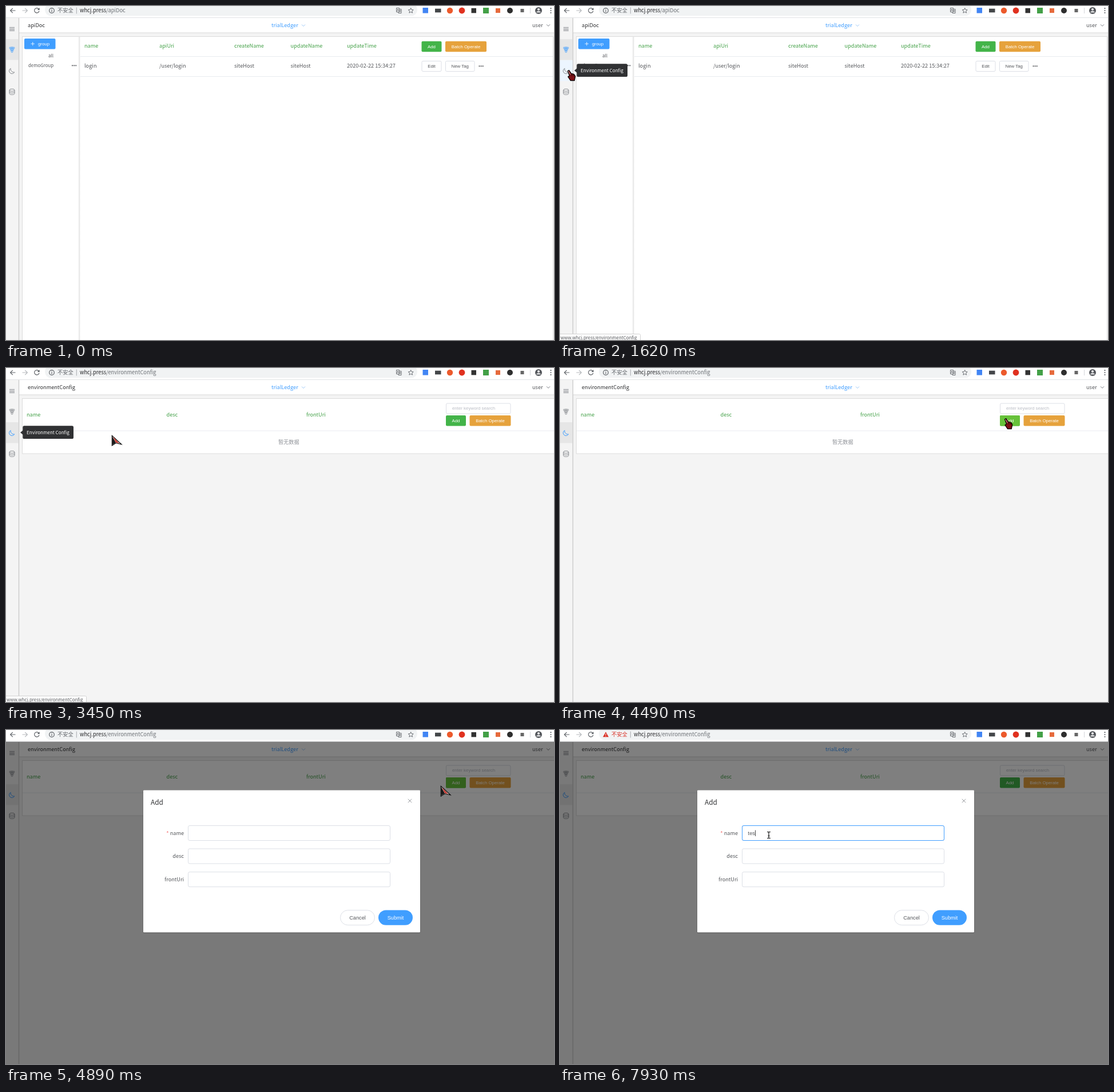
An HTML page for the animation above (8 s loop, 958x585 px).

```html
<!DOCTYPE html>
<html lang="en">
<head>
<meta charset="utf-8">
<title>Environment config</title>
<style>
html, body { margin: 0; width: 100%; height: 100%; overflow: hidden; background: #f4f4f4; }
svg { display: block; width: 100vw; height: 100vh; }
text { font: 9.2px "Noto Sans CJK SC", "Noto Sans CJK", sans-serif; fill: #55575b; white-space: pre; }
.small { font-size: 7.87px; }
.btn { font: 7.87px "Liberation Sans", Arial, sans-serif; text-anchor: middle; }
.big { font: 9.2px "Liberation Sans", Arial, sans-serif; }
.mid { text-anchor: middle; }
.end { text-anchor: end; }
.head text { fill: #43a047; }
.light { fill: #fff; }
.dark { fill: #303133; }
.panel { fill: #fff; stroke: #dcdcdc; }
.rule { stroke: #e9ebf0; }
.field { fill: #fff; stroke: #dcdfe6; }
.green { fill: #43b449; }
.hot { fill: #67c23a; }
.amber { fill: #e6a23c; }
.blue { fill: #409eff; }
.icon { fill: none; stroke: #85888d; }
.icon.on { stroke: #409eff; }
.line { fill: none; stroke: #5f6368; stroke-width: 1.2; }

.anim { opacity: 0; animation: 8s step-end infinite; }
#api { animation-name: api; }
#env { animation-name: env; }
#hover { animation-name: hover; }
#tip { animation-name: tip; }
#status { animation-name: status; }
#hot { animation-name: hot; }
#shade { animation-name: shade; }
#dialog { animation-name: dialog; }
#focus { animation-name: focus; }
#caret { animation-name: caret; }
#safe { animation-name: safe; }
.typed { animation-name: typed; }
#last { animation-name: last; }
#pointer { animation-name: pointer; }
#arrow { animation-name: arrow; }
#hand { animation-name: hand; }
#beam { animation-name: beam; }

@keyframes api { 0% { opacity: 1 } 30.375%, 100% { opacity: 0 } }
@keyframes env { 0% { opacity: 0 } 30.375%, 100% { opacity: 1 } }
@keyframes hover { 0% { opacity: 0 } 12.75% { opacity: 1 } 30.375%, 100% { opacity: 0 } }
@keyframes tip { 0% { opacity: 0 } 12.75% { opacity: 1 } 45.875%, 100% { opacity: 0 } }
@keyframes status { 0% { opacity: 0 } 17.75% { opacity: 1 } 45.875%, 100% { opacity: 0 } }
@keyframes hot { 0% { opacity: 0 } 53.625% { opacity: 1 } 63.625%, 100% { opacity: 0 } }
@keyframes shade { 0% { opacity: 0 } 58.625% { opacity: .41 } 61.125%, 100% { opacity: .5 } }
@keyframes dialog {
  0% { opacity: 0; transform: translateY(-5px) }
  58.625% { opacity: .63; transform: translateY(-5px) }
  61.125%, 100% { opacity: 1; transform: none }
}
@keyframes focus { 0% { opacity: 0 } 71.375%, 100% { opacity: 1 } }
@keyframes caret {
  0% { opacity: 0; transform: none }
  71.375% { opacity: 1; transform: none }
  78.875% { opacity: 0; transform: none }
  84% { opacity: 1; transform: none }
  89.125% { opacity: 0; transform: none }
  94% { opacity: 1; transform: translateX(8px) }
  99.125%, 100% { opacity: 1; transform: translateX(12.5px) }
}
@keyframes safe { 0% { opacity: 1 } 94%, 100% { opacity: 0 } }
@keyframes typed { 0% { opacity: 0 } 94%, 100% { opacity: 1 } }
@keyframes last { 0% { opacity: 0 } 99.125%, 100% { opacity: 1 } }
@keyframes pointer {
  0% { opacity: 0; transform: translate(251px, 205px) }
  2.5% { opacity: 1; transform: translate(251px, 205px) }
  5% { transform: translate(190px, 178px) }
  7.625% { transform: translate(104px, 143px) }
  10.25% { transform: translate(36px, 119px) }
  12.75% { transform: translate(14px, 111px) }
  15.25% { transform: translate(13px, 109px) }
  17.75% { transform: translate(13px, 110px) }
  20.25% { transform: translate(13px, 112px) }
  23% { transform: translate(13px, 111px) }
  25.5% { transform: translate(13px, 112px) }
  32.875% { transform: translate(16px, 113px) }
  35.375% { transform: translate(48px, 115px) }
  38% { transform: translate(104px, 117px) }
  40.625% { transform: translate(160px, 118px) }
  43.125% { transform: translate(185px, 118px) }
  45.875% { transform: translate(300px, 121px) }
  48.375% { transform: translate(490px, 115px) }
  51% { transform: translate(680px, 102px) }
  53.625% { transform: translate(776px, 90px) }
  56.125% { transform: translate(777px, 88px) }
  58.625% { transform: translate(782px, 90px) }
  61.125% { transform: translate(760px, 98px) }
  63.625% { transform: translate(700px, 118px) }
  66.25% { transform: translate(580px, 148px) }
  68.75% { transform: translate(430px, 178px) }
  71.375% { transform: translate(358px, 183px) }
  73.875% { transform: translate(358px, 186px) }
  76.375% { transform: translate(361px, 206px) }
  78.875% { transform: translate(363px, 228px) }
  81.5% { transform: translate(364px, 220px) }
  84% { transform: translate(364px, 202px) }
  86.625% { transform: translate(365px, 188px) }
  89.125%, 100% { opacity: 1; transform: translate(365px, 184px) }
}
@keyframes arrow {
  0% { opacity: 1 } 12.75% { opacity: 0 } 32.875% { opacity: 1 }
  53.625% { opacity: 0 } 58.625% { opacity: 1 } 68.75%, 100% { opacity: 0 }
}
@keyframes hand {
  0% { opacity: 0 } 12.75% { opacity: 1 } 32.875% { opacity: 0 }
  53.625% { opacity: 1 } 58.625%, 100% { opacity: 0 }
}
@keyframes beam { 0% { opacity: 0 } 68.75%, 100% { opacity: 1 } }
</style>
</head>
<body>
<svg viewBox="0 0 958 585">
  <defs>
    <g id="dots"><circle r="1.1"/><circle cx="3.1" r="1.1"/><circle cx="6.2" r="1.1"/></g>
    <path id="chevron" d="M0 0l3 3 3-3" fill="none"/>
    <g id="grape">
      <circle cx="7.5" cy="73.5" r="1.4"/><circle cx="10.5" cy="73" r="1.4"/><circle cx="13.5" cy="73.5" r="1.4"/>
      <circle cx="9" cy="76.5" r="1.4"/><circle cx="12" cy="76.5" r="1.4"/><circle cx="10.5" cy="79.7" r="1.5"/>
    </g>
    <path id="moon" d="M8.2 109.3a4.9 4.9 0 1 0 6.6 6.6a5.6 5.6 0 0 1-6.6-6.6z"/>
    <linearGradient id="gap"><stop stop-color="#e2e2e2"/><stop offset="1" stop-color="#f8f8f8"/></linearGradient>
  </defs>
  <rect width="958" height="585" fill="#f4f4f4"/>

  <!-- page frame -->
  <rect x="23" y="21" width="935" height="25.5" fill="#fff"/>
  <path d="M23 47h935" stroke="#dadada"/>
  <path d="M22.5 21v564" stroke="#cbcbcb" stroke-width="1.4"/>
  <path class="icon" stroke-width="1.2" d="M6 37.5h9M6 40.3h9M6 43.1h9"/>
  <g class="icon">
    <ellipse cx="10.5" cy="147.3" rx="4.5" ry="2"/>
    <path d="M6 147.3v6c0 2.7 9 2.7 9 0v-6M6 150.3c0 2.7 9 2.7 9 0"/>
  </g>
  <text x="464" y="36.7" fill="#409eff" style="fill:#409eff">trialLedger</text>
  <use href="#chevron" x="517" y="32.5" stroke="#9bc9f8"/>
  <text x="920" y="36.7">user</text>
  <use href="#chevron" x="945" y="32.3" stroke="#7b7e84"/>

  <g id="api" class="anim" style="opacity:1">
    <rect y="58" width="22" height="36.5" fill="#e6e6e6"/>
    <use href="#grape" class="icon on"/>
    <use href="#moon" class="icon"/>
    <text class="dark" x="38" y="36.7">apiDoc</text>
    <rect class="panel" x="28.5" y="53.5" width="928" height="540"/>
    <rect x="127" y="54" width="3" height="531" fill="url(#gap)"/>
    <rect class="blue" x="32" y="57" width="54.5" height="18.5" rx="2"/>
    <path d="M43.5 66.2h6.4M46.7 63v6.4" stroke="#fff" stroke-width=".8"/>
    <text class="btn light" x="66" y="69">group</text>
    <text class="small" x="74" y="90.3">all</text>
    <text class="small" x="39" y="107.4">demoGroup</text>
    <use href="#dots" x="116" y="104.3" fill="#55575b"/>
    <g class="head">
      <text x="137" y="73.4">name</text><text x="268" y="73.4">apiUri</text>
      <text x="399" y="73.4">createName</text><text x="497.5" y="73.4">updateName</text>
      <text x="596" y="73.4">updateTime</text>
    </g>
    <path class="rule" d="M130 88.5h826M130 123.5h826"/>
    <text x="137" y="108.3">login</text><text x="268" y="108.3">/user/login</text>
    <text x="399" y="108.3">siteHost</text><text x="497.5" y="108.3">siteHost</text>
    <text x="596" y="108.3">2020-02-22 15:34:27</text>
    <rect class="green" x="726.5" y="61.7" width="35" height="18.5" rx="2"/>
    <text class="btn light" x="744" y="73.8">Add</text>
    <rect class="amber" x="768" y="61.7" width="72" height="18.5" rx="2"/>
    <text class="btn light" x="804" y="73.8">Batch Operate</text>
    <rect class="field" x="727" y="96.5" width="34" height="18" rx="2"/>
    <text class="btn" x="744" y="108.4">Edit</text>
    <rect class="field" x="768.5" y="96.5" width="50.5" height="18" rx="2"/>
    <text class="btn" x="793.7" y="108.4">New Tag</text>
    <use href="#dots" x="827.5" y="105.3" fill="#55575b"/>
  </g>

  <g id="hover" class="anim">
    <rect y="95" width="22" height="36.5" fill="#ecf5ff"/>
    <use href="#moon" class="icon"/>
  </g>

  <g id="env" class="anim">
    <rect y="95" width="22" height="36.5" fill="#e6e6e6"/>
    <use href="#grape" class="icon"/>
    <use href="#moon" class="icon on"/>
    <text class="dark" x="38" y="36.7">environmentConfig</text>
    <rect class="panel" x="28.5" y="53.5" width="940" height="96.5"/>
    <path class="rule" d="M29 110h929"/>
    <g class="head">
      <text x="36" y="84.5">name</text><text x="280.5" y="84.5">desc</text><text x="525" y="84.5">frontUri</text>
    </g>
    <text class="mid" x="494.3" y="133" style="fill:#909399">暂无数据</text>
    <rect class="field" x="769.5" y="62" width="112.5" height="18" rx="2"/>
    <text class="btn" x="780" y="73.4" style="text-anchor:start;fill:#b9bcc4">enter keyword search</text>
    <rect class="green" x="769" y="83" width="35" height="18.5" rx="2"/>
    <rect id="hot" class="hot anim" x="769" y="83" width="35" height="18.5" rx="2"/>
    <text class="btn light" x="786.5" y="95">Add</text>
    <rect class="amber" x="810.5" y="83" width="72" height="18.5" rx="2"/>
    <text class="btn light" x="846.5" y="95">Batch Operate</text>
  </g>

  <g id="tip" class="anim">
    <path d="M25 113l5-4v8z" fill="#303133"/>
    <rect x="29.3" y="101.3" width="88.7" height="22.7" rx="2.6" fill="#303133"/>
    <text class="mid light" x="73.5" y="116.1" style="font-size:8.05px">Environment Config</text>
  </g>
  <g id="status" class="anim">
    <rect x="-2" y="574.5" width="142.5" height="14" rx="2" fill="#fff" stroke="#d2d2d2"/>
    <text class="small" x="1" y="584.3">www.whcj.press/environmentConfig</text>
  </g>

  <rect id="shade" class="anim" y="20" width="958" height="565"/>

  <!-- browser toolbar -->
  <rect width="958" height="20" fill="#fff"/>
  <path d="M0 20.3h958" stroke="#d9dbde" stroke-width=".7"/>
  <rect x="68" y="-4" width="651" height="21.3" rx="10.5" fill="#f1f3f4"/>
  <path class="line" d="M16.5 8H7.6M11.8 3.8L7.6 8l4.2 4.2"/>
  <path class="line" style="stroke:#b5b8bc" d="M28.5 8h8.9M33.2 3.8L37.4 8l-4.2 4.2"/>
  <path class="line" d="M57.3 5.4A4.2 4.2 0 1 0 58 8.6"/><path d="M58.7 3v4h-4z" fill="#5f6368"/>
  <g class="anim typed">
    <path d="M80 3.2l5 9h-10z" fill="#d93025"/><path d="M80 6.2v3M80 10v1.2" stroke="#fff"/>
    <text x="90" y="11.2" style="font-size:9.3px;fill:#d93025">不安全</text>
  </g>
  <g id="safe" class="anim" style="opacity:1">
    <circle class="line" cx="80" cy="8" r="4.3" stroke-width="1"/><path class="line" d="M80 7.3v3.2M80 5.2v1.1"/>
    <text x="90" y="11.2" style="font-size:9.3px;fill:#5f6368">不安全</text>
  </g>
  <path d="M123.3 2.5v11" stroke="#a9acb0"/>
  <text x="129" y="11.2" style="font-size:9.3px;fill:#202124">whcj.press<tspan id="path" fill="#6b6f74">/apiDoc</tspan></text>
  <g id="env" class="anim">
    <rect x="128" y="2" width="150" height="13" fill="#f1f3f4"/>
    <text x="129" y="11.2" style="font-size:9.3px;fill:#202124">whcj.press<tspan fill="#6b6f74">/environmentConfig</tspan></text>
  </g>
  <g class="line" style="stroke-width:.9">
    <path d="M682.5 3.5h5v7h-5zM687.5 5.5h3.5v7h-5l-.5-2M683.7 8.8l1.3-3.5 1.3 3.5M688 8h2.2l-1.7 2.6"/>
    <path d="M707.7 3.5l1.3 3 3.2.3-2.4 2.1.7 3.2-2.8-1.7-2.8 1.7.7-3.2-2.4-2.1 3.2-.3z"/>
  </g>
  <rect x="728.5" y="3" width="9.5" height="9.5" fill="#4285f4"/>
  <rect x="750" y="4.7" width="10.5" height="6.6" fill="#44474a"/>
  <circle cx="776" cy="8" r="5.2" fill="#ec5a2c"/>
  <circle cx="797" cy="8" r="5.4" fill="#e0311f"/>
  <rect x="813.5" y="3.8" width="8.5" height="8.5" fill="#333"/>
  <rect x="834" y="3" width="10" height="10" fill="#43a047"/>
  <rect x="856" y="4" width="8" height="8" fill="#e66a3c"/>
  <circle cx="881" cy="8" r="5" fill="#2e2e2e"/>
  <rect x="899.5" y="5" width="6" height="6" fill="#666"/>
  <path d="M916.5 3v10" stroke="#d5d7da"/>
  <circle cx="931" cy="8" r="6" fill="#54575c"/>
  <circle cx="931" cy="6" r="2" fill="#fff"/><path d="M927 11.2c1-3 7-3 8 0z" fill="#fff"/>
  <g fill="#5f6368"><circle cx="952.5" cy="4.2" r="1.1"/><circle cx="952.5" cy="8" r="1.1"/><circle cx="952.5" cy="11.8" r="1.1"/></g>

  <g id="dialog" class="anim">
    <rect x="239.5" y="106" width="485" height="250" rx="2" opacity=".18"/>
    <rect x="240" y="105.5" width="484" height="249" rx="1.3" fill="#fff"/>
    <text class="dark" x="253" y="131" style="font-size:11.8px">Add</text>
    <path d="M702.8 120.8l6.4 6.4M709.2 120.8l-6.4 6.4" stroke="#909399" stroke-width=".9"/>
    <text class="end" x="311" y="183.8"><tspan fill="#f56c6c">* </tspan>name</text>
    <text class="end" x="311" y="224.4">desc</text>
    <text class="end" x="311" y="265">frontUri</text>
    <rect class="field" x="318.5" y="167.5" width="353" height="26" rx="2.6"/>
    <rect class="field" x="318.5" y="208" width="353" height="26" rx="2.6"/>
    <rect class="field" x="318.5" y="248.7" width="353" height="26" rx="2.6"/>
    <rect id="focus" class="anim" x="318.5" y="167.5" width="353" height="26" rx="2.6" fill="none" stroke="#409eff"/>
    <text class="big anim typed" x="328.6" y="183.8">te</text>
    <text id="last" class="big anim" x="336.3" y="183.8">s</text>
    <path id="caret" class="anim" d="M329.5 175.5v10.5" stroke="#333" stroke-width=".9"/>
    <rect class="field" x="584.5" y="315.7" width="60" height="26" rx="13"/>
    <text class="big mid" x="614.5" y="332">Cancel</text>
    <rect class="blue" x="651" y="315.4" width="60" height="26.4" rx="13.2"/>
    <text class="big mid light" x="681" y="332">Submit</text>
  </g>

  <g id="pointer" class="anim">
    <g id="arrow" class="anim">
      <path d="M.3 .3L17 15.8L7 13.5L.3 18z" fill="#eee" stroke="#000" stroke-width="1.1"/>
      <path d="M1 2L7 13L1 16.5z" fill="#1a1a1a"/>
      <path d="M2 2.5L13 14L7 12.6z" fill="#c9342c"/>
    </g>
    <g id="hand" class="anim">
      <path d="M.5 1.8L2.8 .5L6.5 6L11.5 7.5L13.8 11L12.2 18.7H5.5L1 12L3.6 10z" fill="#7d1015" stroke="#000" stroke-width="1.2"/>
      <path d="M1.6 2l3.6 6.4" stroke="#e8c9c6" stroke-width=".9"/>
      <path d="M6.8 7v3.5M9.3 7.5v3M11.6 8.5v2.5" stroke="#000" stroke-width=".7"/>
    </g>
    <path id="beam" class="anim" d="M-3 -5.5h2.3l.7.6.7-.6H3M0 -5v10M-3 5.5h2.3l.7-.6.7.6H3M-1.5 1.5h3" fill="none" stroke="#111" stroke-width="1.2"/>
  </g>
</svg>
</body>
</html>
```
